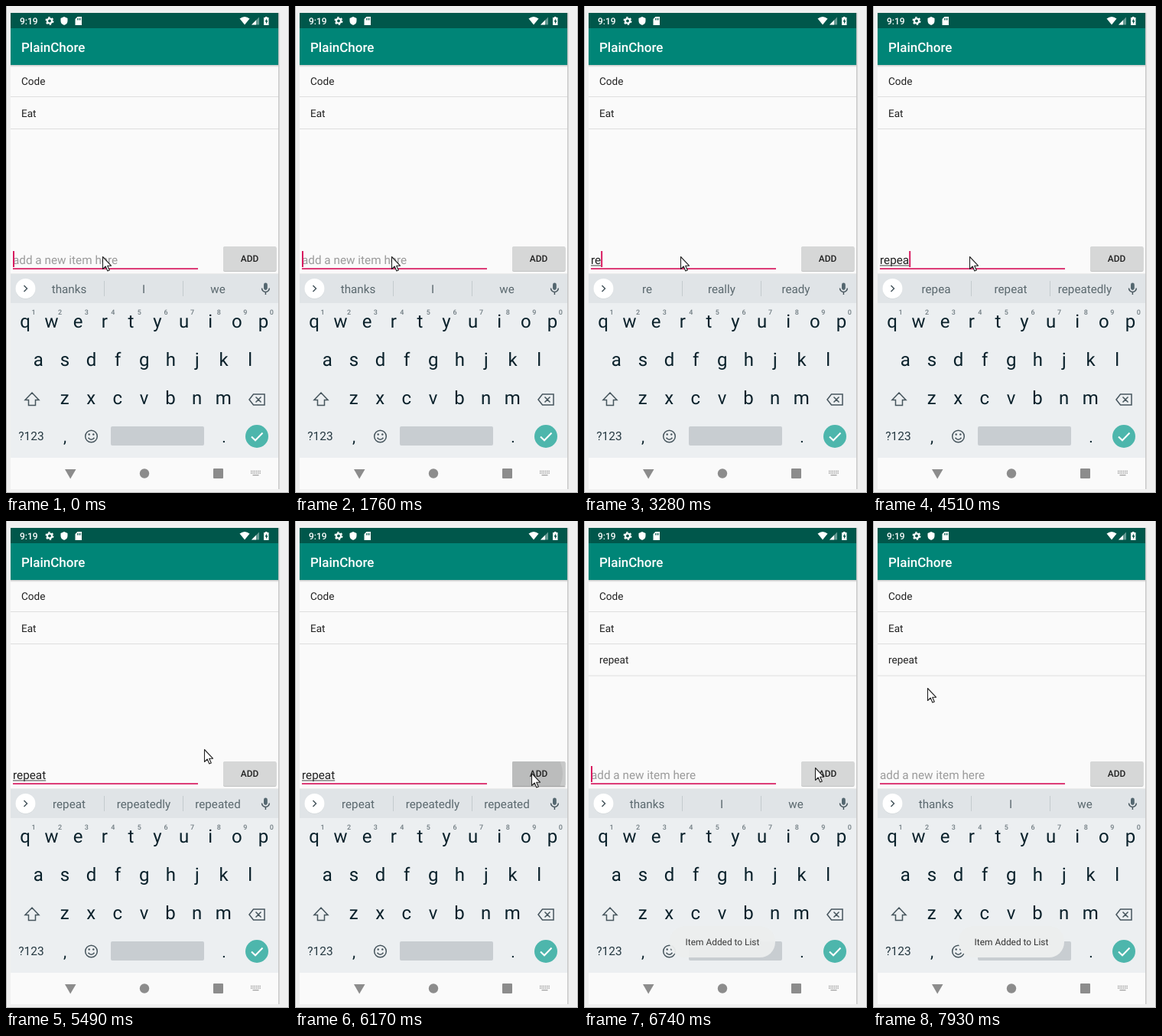
These frames come from a looping animation (370x636 px, 8 s). An HTML page:

```html
<!DOCTYPE html>
<html lang="en">
<head>
<meta charset="utf-8">
<title>Todo list</title>
<style>
  html, body { margin: 0; width: 100%; height: 100%; overflow: hidden; background: #f0f0f0; }
  svg { display: block; width: 370px; height: 636px; font-family: Roboto, sans-serif; text-rendering: geometricPrecision; }
  .mid { text-anchor: middle; }
  .list { font-size: 13.6px; fill: #212121; }
  .field { font-size: 15.3px; }
  .sug { font-size: 15.2px; fill: #5a686e; }
  .key { font-size: 24px; fill: #0a212b; }
  .dot { font-size: 21px; }
  .num { font-size: 9px; font-weight: 500; fill: #707c82; }
  .line { fill: none; stroke: #46555d; stroke-width: 1.5; }
</style>
</head>
<body>
<svg viewBox="0 0 370 636">
  <linearGradient id="shade" x2="0" y2="1">
    <stop stop-opacity=".2"/>
    <stop offset="1" stop-opacity="0"/>
  </linearGradient>
  <rect width="370" height="636" fill="#f0f0f0"/>
  <path d="M.5 0V635.500H369.500V0" fill="none" stroke="#b4b4b4"/>
  <rect x="356" y="9" width="1.500" height="622" fill="#c8c8c8"/>
  <rect x="6" y="9" width="350" height="622" fill="#fafafa"/>
  <rect x="6" y="9" width="350" height="20" fill="#00574b"/>
  <rect x="6" y="29" width="350" height="48" fill="#008577"/>
  <rect x="6" y="77" width="350" height="3" fill="url(#shade)"/>

  <!-- status bar -->
  <g fill="#fff">
    <text x="18" y="24" font-size="12" font-weight="500">9:19</text>
    <circle cx="57" cy="19.5" r="3" fill="none" stroke="#fff" stroke-width="2.2"/>
    <circle cx="57" cy="19.5" r="4.7" fill="none" stroke="#fff" stroke-width="1.6" stroke-dasharray="2.46"/>
    <path d="M76 14L80.500 16V19.500Q80.500 23.500 76 25Q71.500 23.500 71.500 19.500V16Z"/>
    <path d="M93.500 14H99V25H90.500V17Z"/>
    <path d="M93.500 16V18.500M95.500 16V18.500M97.300 16V18.500" stroke="#00574b"/>
    <path d="M305.500 16.500Q312 11.500 318.500 16.500L312 24.500Z"/>
    <path d="M321 24.500L331 14.500V24.500Z" opacity=".4"/>
    <path d="M321 24.500L327 18.500V24.500Z"/>
    <path d="M337 15H339V14H341.500V15H343.500V25H337Z"/>
    <path d="M341 16.500L338.500 20.500H340V23.500L342.500 19.300H341Z" fill="#00574b"/>
  </g>
  <text x="20" y="60" font-size="17" font-weight="500" fill="#fff">PlainChore</text>

  <!-- list -->
  <g class="list">
    <text x="20" y="103">Code</text>
    <text x="20" y="145">Eat</text>
    <path d="M6 118.500H356M6 160.500H356" stroke="#dedede"/>
    <g id="item">
      <text x="20" y="186">repeat</text>
      <path d="M6 202H356" stroke="#dedede"/>
    </g>
  </g>

  <!-- input row -->
  <text id="hint" class="field" x="9" y="337" fill="#9b9b9b">add a new item here</text>
  <text id="typed" class="field" x="9" y="337" fill="#212121"></text>
  <rect id="under" x="9" y="338.500" height="1" fill="#444"/>
  <rect x="9" y="342.300" width="242" height="1.700" fill="#d81b60"/>
  <rect id="caret" y="320" width="2" height="21" fill="#d81b60"/>
  <clipPath id="btn"><rect x="284" y="314" width="69.500" height="32" rx="2"/></clipPath>
  <rect x="284" y="314.500" width="69.500" height="32.500" rx="2" fill="#c2c3c3"/>
  <rect x="284" y="314" width="69.500" height="32" rx="2" fill="#d6d7d7"/>
  <g id="press">
    <rect x="284" y="346" width="69.500" height="3" fill="url(#shade)"/>
    <g clip-path="url(#btn)">
      <rect x="284" y="314" width="70" height="32" fill="#c8c9c9"/>
      <circle cx="312" cy="330" r="38" fill="#bbbcbc"/>
    </g>
  </g>
  <text class="mid" x="318.500" y="334.300" font-size="11.900" font-weight="500" fill="#212121">ADD</text>

  <!-- keyboard -->
  <rect x="6" y="349" width="350" height="1" fill="#ececec"/>
  <rect x="6" y="350" width="350" height="38" fill="#e0e4e7"/>
  <rect x="6" y="388" width="350" height="202" fill="#eceff1"/>
  <path d="M128.500 359V379M231.500 359V379" stroke="#c3cacd"/>
  <circle cx="25.500" cy="369.700" r="13" fill="#d3d8da"/>
  <circle cx="25.500" cy="369" r="13" fill="#fff"/>
  <path class="line" d="M23.500 365L27.500 369L23.500 373"/>
  <g class="sug mid">
    <text x="82.500" y="375"></text>
    <text x="180" y="375"></text>
    <text x="277" y="375"></text>
  </g>
  <rect x="337" y="361.500" width="4.800" height="9.500" rx="2.400" fill="#546770"/>
  <path class="line" d="M334.500 368.500A4.900 4.900 0 0 0 344.300 368.500M339.400 373.500V377"/>
  <g id="keys"></g>
  <path class="line" d="M34 505L43 514.500H38.500V521.500H29.500V514.500H25Z"/>
  <path class="line" d="M323.500 507H338V521H323.500L318 514ZM326.500 510.500L333.500 517.500M333.500 510.500L326.500 517.500"/>
  <text class="mid" x="33" y="567" font-size="15.500" fill="#263942">?123</text>
  <text class="key dot mid" x="77" y="570">,</text>
  <text class="key dot mid" x="285" y="570">.</text>
  <circle class="line" cx="111.500" cy="562" r="7.800"/>
  <path class="line" d="M107.500 563.800Q111.500 568.800 115.500 563.800"/>
  <circle cx="108.700" cy="559.500" r="1.200" fill="#46555d"/>
  <circle cx="114.300" cy="559.500" r="1.200" fill="#46555d"/>
  <rect x="137" y="549" width="122" height="25" rx="2" fill="#c8cdd1"/>
  <circle cx="328" cy="562" r="15" fill="#4db6ac"/>
  <path d="M321 562.500L326 567.300L335.500 557.500" fill="none" stroke="#fff" stroke-width="2"/>

  <!-- navigation bar -->
  <g fill="#8c8c8c">
    <path d="M77 605H91.500L84.200 617.500Z"/>
    <circle cx="181" cy="610.500" r="6.200"/>
    <rect x="271" y="604" width="13" height="13" rx="1"/>
    <path d="M320 607.500H333M320 610H333" stroke="#9a9a9a" stroke-width="1.300" stroke-dasharray="1.300 1"/>
    <path d="M322.500 612.700H330.500" stroke="#9a9a9a" stroke-width="1.200"/>
  </g>

  <g id="toast">
    <rect x="112" y="529" width="138" height="41" rx="20" fill="#eceeee"/>
    <text class="mid" x="181" y="554" font-size="11.900" fill="#323232">Item Added to List</text>
  </g>
  <path id="mouse" d="M.5 .5V16.500L4.200 13L6.800 19L9.300 18L6.700 12.200H11.500Z" fill="#fff" stroke="#222" stroke-width="1.100" stroke-linejoin="round"/>
</svg>
<script>
const LOOP = 8000;
const $ = id => document.getElementById(id);
const [item, hint, typed, under, caret, press, toast, mouse] =
  ['item', 'hint', 'typed', 'under', 'caret', 'press', 'toast', 'mouse'].map($);
const words = document.querySelectorAll('.sug text');

function key(cls, x, y, label) {
  const t = document.createElementNS('http://www.w3.org/2000/svg', 'text');
  t.setAttribute('class', cls + ' mid');
  t.setAttribute('x', x);
  t.setAttribute('y', y);
  t.textContent = label;
  $('keys').append(t);
}
[['qwertyuiop', 25], ['asdfghjkl', 42.3], ['zxcvbnm', 76.7]].forEach(([row, x], r) => {
  [...row].forEach((c, i) => {
    key('key', x + i * 34.6, 420 + r * 50, c);
    if (!r) key('num', x + 11 + i * 34.6, 403, (i + 1) % 10);
  });
});

// Each track lists [start, value]; a value holds until the next start.
const tracks = {
  text: [[0, ''], [2040, 'r'], [2160, ''], [3000, 'r'], [3280, 're'], [4120, 'rep'],
    [4240, 'repe'], [4360, 'repea'], [4790, 'repeat'], [6320, '']],
  words: [[0, 'thanks I we'], [3000, 'r are right'], [3280, 're really ready'],
    [4120, 'rep reply report'], [4360, 'repe repeat repeatedly'],
    [4510, 'repea repeat repeatedly'], [4790, 'repeat repeatedly repeated'],
    [6320, 'thanks I we']],
  caret: [[0, 1], [400, 0], [830, 1], [1360, 0], [1760, 1], [2850, 0], [3000, 1], [3810, 0],
    [4120, 1], [5220, 0], [5640, 1], [6170, 0], [6320, 1], [6860, 0], [7260, 1], [7810, 0]],
  mouse: [[0, [126, 327]], [5370, [178, 308]], [5490, [259, 298]], [5640, [292, 312]],
    [5760, [309, 329]], [6740, [302, 322]], [6860, [294, 321]], [7010, [232, 286]],
    [7130, [142, 241]], [7260, [82, 222]], [7810, [76, 219]], [7930, [71, 218]]],
  press: [[0, 0], [6170, 1], [6320, .5], [6440, 0]],
  item: [[0, 0], [6320, 1]],
  toast: [[0, 0], [6440, .4], [6740, .95], [6860, 1]]
};
const at = (name, t) => tracks[name].findLast(([start]) => start <= t)[1];
const fade = (el, v) => el.setAttribute('opacity', v);

function draw(t) {
  const text = at('text', t);
  typed.textContent = text;
  const width = text ? typed.getComputedTextLength() : 0;
  fade(hint, text ? 0 : 1);
  under.setAttribute('width', width);
  caret.setAttribute('x', 9 + width);
  at('words', t).split(' ').forEach((w, i) => { words[i].textContent = w; });
  fade(caret, at('caret', t));
  fade(press, at('press', t));
  fade(item, at('item', t));
  fade(toast, at('toast', t));
  mouse.setAttribute('transform', `translate(${at('mouse', t)})`);
}

const begin = performance.now();
function tick() {
  draw((performance.now() - begin) % LOOP);
  requestAnimationFrame(tick);
}
tick();
</script>
</body>
</html>
```
